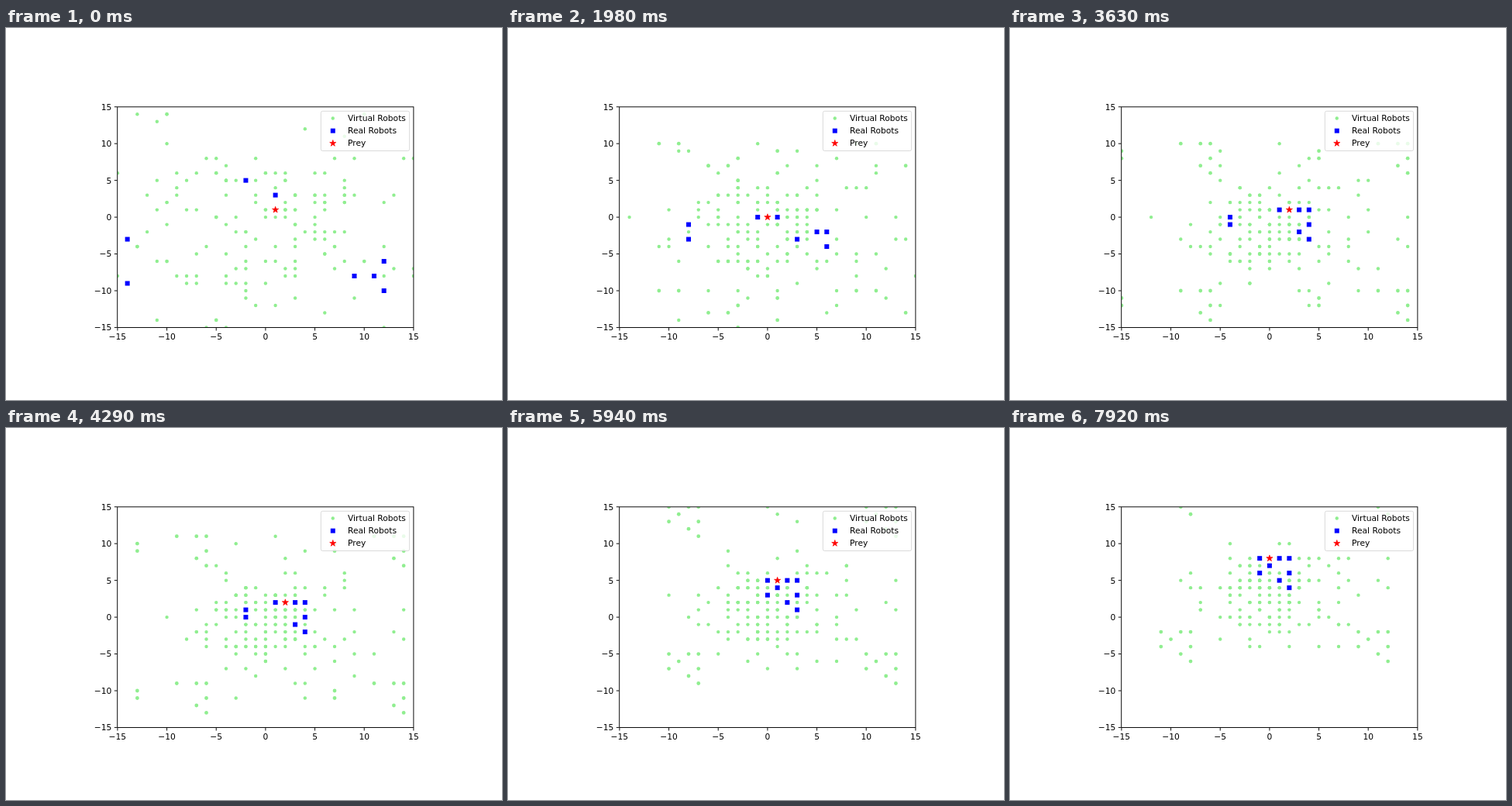
These frames come from a looping animation (640 by 480 pixels, 8000 ms). An HTML page:

```html
<!DOCTYPE html>
<html lang="en">
<head>
<meta charset="utf-8">
<title>Robots and prey</title>
<style>
  html, body { margin: 0; width: 100%; height: 100%; overflow: hidden; background: #fff; }
  svg { display: block; width: 640px; height: 480px; }
  text { font-family: "DejaVu Sans", sans-serif; font-size: 10.7px; fill: #000; }
</style>
</head>
<body>
<svg id="stage" viewBox="0 0 640 480">
  <defs><clipPath id="plot"><rect x="144" y="102" width="382" height="284.3"/></clipPath></defs>
</svg>
<script>
const NS = "http://www.w3.org/2000/svg";
const LOOP = 8000, STEP = 330, LAST = 24;
const CLOUD = 150, REACH = 10, SPEED = 0.95;

// Each robot: start cell and the slot beside the prey it heads for.
const ROBOTS = [
  { start: [-14, -3], slot: [0, -1] },
  { start: [-14, -9], slot: [-1, -2] },
  { start: [-2, 5], slot: [-1, 0] },
  { start: [1, 3], slot: [1, 0] },
  { start: [9, -8], slot: [1, -3] },
  { start: [11, -8], slot: [2, 0] },
  { start: [12, -6], slot: [2, -2] },
  { start: [12, -10], slot: [2, -4] }
];
// Turning points of the prey.
const PREY = [
  { step: 0, at: [1, 1] }, { step: 6, at: [0, 0] }, { step: 9, at: [2, -1] }, { step: 13, at: [2, 2] },
  { step: 16, at: [1, 4] }, { step: 20, at: [0, 6] }, { step: 24, at: [0, 8] }
];

const stage = document.getElementById("stage");
const px = x => 334.9 + x * 12.733;
const py = y => 244.1 - y * 9.49;
const clamp = (v, m) => Math.max(-m, Math.min(m, v));
const rand = n => { const v = Math.sin(n * 127.1 + 3.7) * 43758.5453; return v - Math.floor(v); };
const bell = n => 2 * (rand(n) + rand(n + 0.31) + rand(n + 0.67) - 1.5);

function add(tag, attrs, parent = stage) {
  const el = document.createElementNS(NS, tag);
  for (const k in attrs) el.setAttribute(k, attrs[k]);
  parent.appendChild(el);
  return el;
}
function label(str, x, y, anchor) {
  add("text", { x, y, "text-anchor": anchor }).textContent = str;
}
const dot = (parent, r = 2.2) => add("circle", { r, fill: "#90ee90" }, parent);
const square = parent => add("rect", { x: -3, y: -3, width: 6, height: 6, fill: "#00f" }, parent);
function star(parent) {
  const pts = Array.from({ length: 10 }, (_, i) => {
    const a = i * Math.PI / 5, r = i % 2 ? 1.65 : 4.3;
    return (r * Math.sin(a)).toFixed(2) + "," + (-r * Math.cos(a)).toFixed(2);
  });
  return add("polygon", { points: pts.join(" "), fill: "#f00", stroke: "#f00", "stroke-width": 0.7 }, parent);
}
const move = (el, x, y) => el.setAttribute("transform", `translate(${x.toFixed(2)} ${y.toFixed(2)})`);
const place = (el, [x, y]) => move(el, px(Math.round(x)), py(Math.round(y)));

function preyAt(step) {
  const k = Math.max(1, PREY.findIndex(p => p.step >= step));
  const a = PREY[k - 1], b = PREY[k];
  const u = (step - a.step) / (b.step - a.step);
  return a.at.map((v, c) => v + (b.at[c] - v) * u);
}

// Every robot closes in on its slot, a limited distance per step and axis.
function chase() {
  const track = [ROBOTS.map(r => r.start)];
  for (let s = 1; s <= LAST; s++) {
    const goal = preyAt(s);
    track.push(track[s - 1].map((p, i) =>
      p.map((v, c) => v + clamp(goal[c] + ROBOTS[i].slot[c] - v, SPEED))));
  }
  return track;
}
const track = chase();
const lead = track[0].map((p, i) => p.map((v, c) => 2 * v - track[1][i][c]));

const field = add("g", { "clip-path": "url(#plot)" });

// Virtual robots: copies at a fixed reach plus a cloud around the swarm.
const images = [];
ROBOTS.forEach((_, i) => {
  for (let dx = -REACH; dx <= REACH; dx += REACH)
    for (let dy = -REACH; dy <= REACH; dy += REACH) {
      const corner = dx && dy;
      if (!corner && (!(dx || dy) || rand(i * 31 + dx * 3 + dy) > 0.42)) continue;
      images.push({ el: dot(field, corner ? 2.4 : 2.2), i, dx, dy });
    }
});
const cloud = Array.from({ length: CLOUD }, (_, i) => {
  const spread = 0.65 + 0.75 * rand(i + 0.9);
  return { el: dot(field), x: bell(i + 11) * spread, y: bell(i + 507) * spread, phase: 6.28 * rand(i + 900) };
});
const reals = ROBOTS.map(() => square(field));
const prey = star(field);

function drawAxes() {
  const line = { fill: "none", stroke: "#000", "stroke-width": 0.95 };
  add("rect", { x: 143.7, y: 101.8, width: 382.2, height: 284.7, ...line });
  for (let v = -15; v <= 15; v += 5) {
    const name = String(v).replace("-", "\u2212");
    add("path", { d: `M${px(v)} 386.8v3.7M143.5 ${py(v)}h-3.7`, ...line });
    label(name, px(v), 402.2, "middle");
    label(name, 136.3, py(v) + 3.9, "end");
  }
}

function drawLegend() {
  add("rect", { x: 406.4, y: 107.3, width: 114.2, height: 51.2, rx: 2.1,
    fill: "#fff", "fill-opacity": 0.8, stroke: "#ccc", "stroke-opacity": 0.8, "stroke-width": 0.9 });
  [["Virtual Robots", dot], ["Real Robots", square], ["Prey", star]].forEach(([name, mark], i) => {
    const y = 116.2 + i * 16.15;
    move(mark(stage), 421.8, y + 0.3);
    label(name, 441, y + 3.7, "start");
  });
}

function render(t) {
  const step = Math.min(LAST, Math.floor((t % LOOP) / STEP));
  const before = step ? track[step - 1] : lead;
  const mean = c => before.reduce((s, p) => s + p[c], 0) / ROBOTS.length;
  const fade = Math.exp(-step / 6);
  const cx = 0.2 * mean(0), cy = 0.6 * mean(1) * (1 - fade);
  const sx = 3 + 5.5 * fade, sy = 2.9 + 4 * fade;

  for (const m of images) place(m.el, [before[m.i][0] + m.dx, before[m.i][1] + m.dy]);
  for (const c of cloud) {
    const a = step * 0.9 + c.phase;
    place(c.el, [cx + c.x * sx + 0.6 * Math.cos(a), cy + c.y * sy + 0.6 * Math.sin(a)]);
  }
  reals.forEach((el, i) => place(el, track[step][i]));
  place(prey, preyAt(step));
}

drawAxes();
drawLegend();
const start = performance.now();
function tick() {
  render(performance.now() - start);
  requestAnimationFrame(tick);
}
render(0);
requestAnimationFrame(tick);
</script>
</body>
</html>
```
